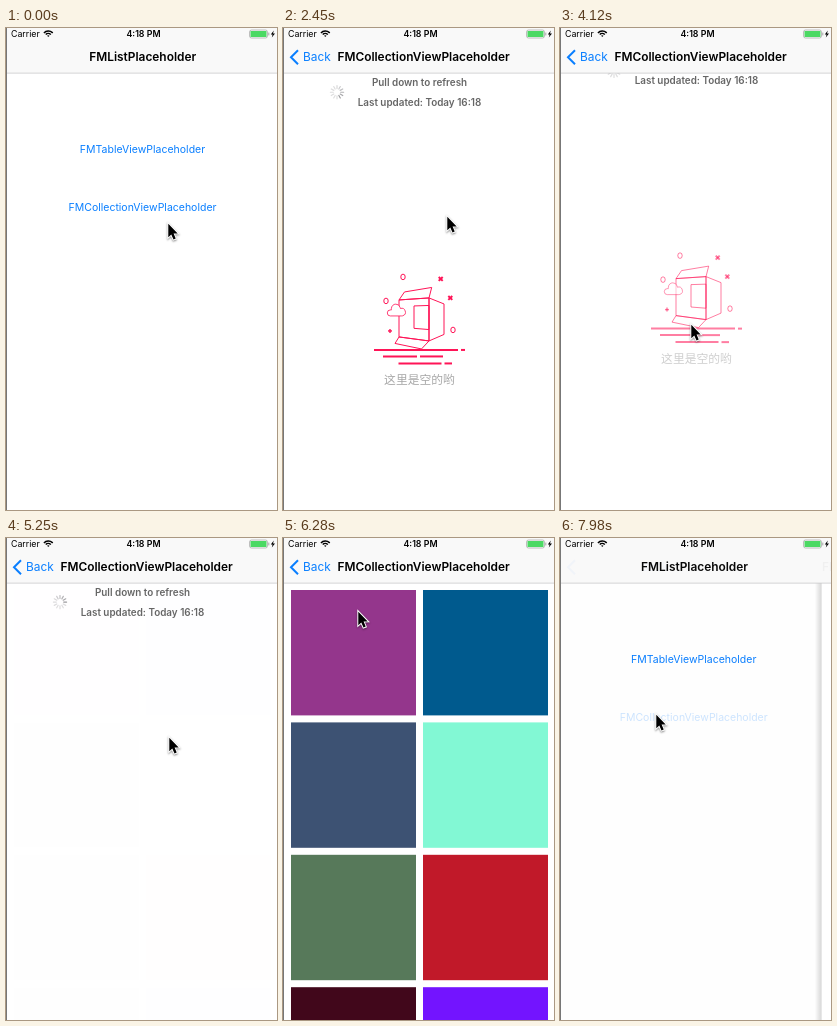
Animation of 271x482 px, one loop 8000 ms. Source, as an HTML page with a canvas:

```html
<!DOCTYPE html>
<html lang="en">
<head>
<meta charset="utf-8">
<title>List placeholder demo</title>
<style>
  html, body { margin: 0; width: 100%; height: 100%; overflow: hidden; background: #fff; }
  canvas { display: block; width: 271px; height: 482px; }
</style>
</head>
<body>
<canvas id="stage"></canvas>
<script>
const W = 271, H = 482, LOOP = 8000, BAR = 45, HEADER = 39;
const FIRST_TAP = 1030, POP = 7165, SECOND_TAP = 7890;
const TAP_DELAY = 83, SLIDE = 540;
const BLUE = '#0a7fff', PINK = '#ff1457';
const SANS = 'Inter, Roboto, sans-serif';
const CELLS = ['#94368c', '#005a8e', '#3d5273', '#82f8d4', '#57795a', '#c11929', '#41071b', '#7314ff'];

// Cursor moves: start, end, x, y
const MOVES = [
  [210, 1000, 146, 174], [1150, 1750, 164, 188], [3530, 3810, 130, 258], [4000, 4110, 131, 296],
  [4350, 4790, 163, 199], [5620, 6280, 75, 73], [6710, 6920, 28, 22], [7300, 7760, 96, 176]
];

const canvas = document.getElementById('stage');
const c = canvas.getContext('2d');
const dpr = window.devicePixelRatio || 1;
canvas.width = W * dpr;
canvas.height = H * dpr;

const clamp = v => Math.max(0, Math.min(1, v));
const mix = (a, b, p) => a + (b - a) * p;

function bezier(x1, y1, x2, y2) {
  const at = (a, b, s) => 3 * a * s * (1 - s) * (1 - s) + 3 * b * s * s * (1 - s) + s * s * s;
  return x => {
    let lo = 0, hi = 1;
    for (let i = 0; i < 24; i++) {
      const mid = (lo + hi) / 2;
      if (at(x1, x2, mid) < x) lo = mid; else hi = mid;
    }
    return at(y1, y2, lo);
  };
}
const easeInOut = bezier(0.42, 0, 0.58, 1);
const easeSlide = bezier(0.32, 0.72, 0, 1);

function ramp(t, start, length, ease = easeInOut) {
  const x = clamp((t - start) / length);
  return x === 0 || x === 1 ? x : ease(x);
}

function layer(alpha, dx, dy, draw) {
  if (alpha <= 0) return;
  c.save();
  c.globalAlpha *= alpha;
  c.translate(dx, dy);
  draw();
  c.restore();
}

function text(str, x, y, { size, weight = 400, color = '#000', align = 'center', family = SANS }) {
  c.font = `${weight} ${size}px ${family}`;
  c.fillStyle = color;
  c.textAlign = align;
  c.fillText(str, x, y);
}

function path(points, close) {
  c.beginPath();
  points.forEach(([x, y]) => c.lineTo(x, y));
  if (close) c.closePath();
}

function line(x1, y1, x2, y2) {
  path([[x1, y1], [x2, y2]]);
  c.stroke();
}

function drawStatus() {
  text('Carrier', 5, 9.2, { size: 8.8, align: 'left' });
  text('4:18 PM', 137.5, 9.2, { size: 8.8, weight: 600 });

  c.strokeStyle = c.fillStyle = '#000';
  c.lineWidth = 1.5;
  for (const r of [1, 3.5, 6]) {
    c.beginPath();
    c.arc(42.3, 9, r, -Math.PI * 0.76, -Math.PI * 0.24);
    c.stroke();
  }

  c.strokeStyle = c.fillStyle = '#a5a5a5';
  c.lineWidth = 0.7;
  c.beginPath();
  c.roundRect(243.5, 2, 18, 8, 2);
  c.stroke();
  c.fillRect(262.3, 4.6, 1, 2.8);
  c.fillStyle = '#4cd964';
  c.fillRect(244.5, 3, 16, 6);

  c.fillStyle = '#000';
  path([[267.8, 2.5], [264.8, 6.5], [266.6, 6.5], [265.8, 9.6], [269, 5.4], [267, 5.4]], true);
  c.fill();
}

function drawNav(root, back, titleX) {
  c.fillStyle = '#f9f9f9';
  c.fillRect(0, 0, W, BAR);
  c.fillStyle = '#c9c9cb';
  c.fillRect(0, BAR - 0.3, W, 0.8);

  const title = { size: 11.9, weight: 600 };
  layer(back, 0, 0, () => {
    c.strokeStyle = BLUE;
    c.lineWidth = 2;
    path([[15, 22.2], [8, 29.2], [15, 36.2]]);
    c.stroke();
    text('Back', 20 + root * 63, 33.4, { size: 11.9, color: BLUE, align: 'left' });
  });
  layer(root, (root - 1) * 63, 0, () => text('FMListPlaceholder', 136.7, 33.4, title));
  layer(1 - root, titleX, 0, () => text('FMCollectionViewPlaceholder', 140.6, 33.4, title));
  drawStatus();
}

function drawMenu(lit) {
  c.fillStyle = '#fff';
  c.fillRect(0, 0, W, H);
  const link = { size: 10.5, color: BLUE };
  text('FMTableViewPlaceholder', 136.5, 125, link);
  layer(lit, 0, 0, () => text('FMCollectionViewPlaceholder', 136.5, 183.3, link));
}

function drawSpinner(t) {
  const head = Math.floor(t * 12 / 1000);
  c.strokeStyle = '#646469';
  c.lineCap = 'round';
  c.lineWidth = 1.2;
  for (let i = 0; i < 12; i++) {
    const age = (head - i) % 12;
    layer(Math.max(0.22, 0.65 - age * 0.08), 54, 64.3, () => {
      c.rotate(i * Math.PI / 6);
      line(0, -3.7, 0, -6.6);
    });
  }
  c.lineCap = 'butt';
}

function drawBox() {
  const a = [116, 272], b = [146, 270], d = [146, 313], e = [116, 309];
  const front = (u, v) => [mix(a[0], b[0], u), mix(mix(a[1], b[1], u), mix(e[1], d[1], u), v)];
  const faces = [
    [a, b, d, e],
    [a, [121.5, 264], [148.7, 259.5], b],
    [b, [161, 276], [161, 306.5], d],
    [e, [112, 315.5], [138.5, 321], d],
    [front(1, 0.175), front(0.5, 0.175), front(0.5, 0.735), front(1, 0.735)]
  ];
  c.lineWidth = 1;
  for (const face of faces) {
    path(face, true);
    c.stroke();
  }
}

function drawCloud() {
  const { PI } = Math;
  c.lineWidth = 0.8;
  c.fillStyle = '#fff';
  c.beginPath();
  c.arc(107.3, 285, 3, PI / 2, -PI * 0.4);
  c.arc(112.8, 280.6, 4.4, PI, -PI * 0.1);
  c.arc(118.6, 284.2, 3.8, -PI * 0.6, PI / 2);
  c.closePath();
  c.fill();
  c.stroke();
}

const MARKS = {
  ring() {
    c.lineWidth = 1;
    c.beginPath();
    c.ellipse(0, 0, 2.2, 2.8, 0, 0, 7);
    c.stroke();
  },
  plus() {
    c.lineWidth = 1.4;
    line(-2, 0, 2, 0);
    line(0, -2, 0, 2);
  },
  cross() {
    c.rotate(Math.PI / 4);
    c.scale(1.4, 1.4);
    MARKS.plus();
  }
};

function drawEmpty() {
  c.strokeStyle = PINK;
  c.lineJoin = 'round';
  drawBox();
  drawCloud();

  const mark = (kind, x, y) => layer(1, x, y, MARKS[kind]);
  mark('ring', 120, 249);
  mark('ring', 103, 273);
  mark('ring', 170, 302);
  mark('cross', 157.7, 251);
  mark('cross', 167.3, 270);
  mark('plus', 107, 303);

  // Ground: each line breaks once near its right end
  const ground = (x, gap, end, y) => {
    line(x, y, gap, y);
    line(gap + 3, y, end, y);
  };
  c.lineWidth = 2;
  ground(91, 175, 182, 322);
  ground(100, 134, 160, 328.5);
  ground(115.5, 158.5, 169, 335.5);

  text('这里是空的哟', 136.5, 356, {
    size: 11.8, weight: 300, color: '#a8a8a8', family: '"Noto Sans CJK SC", "Noto Sans CJK", sans-serif'
  });
}

function drawCells() {
  CELLS.forEach((color, i) => {
    c.fillStyle = color;
    c.fillRect(8 + i % 2 * 132, 52 + (i >> 1) * 132.4, 125, 125.4);
  });
}

function drawHeader(t, open, loading) {
  const label = { size: 9.9, weight: 600, color: '#666' };
  text(loading ? 'Loading ...' : 'Pull down to refresh', 136.5, 58.4, label);
  text('Last updated: Today 16:18', 136.5, 77.8, label);
  layer(loading ? 1 : open, 0, 0, () => drawSpinner(t));
}

// Two refreshes: the first ends with the placeholder, the second with cells
function drawList(t) {
  const again = t > 4000, fresh = t >= SECOND_TAP;
  const [start, end] = again ? [4003, 5230] : [1150, 2440];
  const opened = fresh ? 0 : ramp(t, start, 250);
  const closed = fresh ? 0 : ramp(t, end, 400);
  const open = opened - closed, loading = t < end;

  c.fillStyle = '#fff';
  c.fillRect(0, 0, W, H);
  const y = (open - 1) * HEADER;
  layer(again ? (fresh ? 0 : 1 - opened) : +!loading, 0, y, drawEmpty);
  layer(again ? closed : 0, 0, 0, drawCells);
  layer(+(open > 0), 0, y, () => drawHeader(t, open, loading));
}

function drawEdge(x) {
  const g = c.createLinearGradient(x - 7, 0, x, 0);
  g.addColorStop(0, 'rgba(0,0,0,0)');
  g.addColorStop(1, 'rgba(0,0,0,.16)');
  c.fillStyle = g;
  c.fillRect(x - 7, 0, 7, H);
}

function drawCursor(t) {
  let x = 162, y = 195;
  for (const [start, end, toX, toY] of MOVES) {
    const p = ramp(t, start, end - start);
    x = mix(x, toX, p);
    y = mix(y, toY, p);
  }
  layer(1, x, y, () => {
    path([[0.3, 0.8], [0.3, 14.2], [3.3, 11.5], [5.5, 16.5], [7.7, 15.6], [5.6, 10.6], [9.7, 10.4]], true);
    c.lineJoin = 'miter';
    c.lineWidth = 2;
    c.strokeStyle = '#fff';
    c.shadowColor = 'rgba(0,0,0,.45)';
    c.shadowBlur = 2 * dpr;
    c.shadowOffsetY = dpr;
    c.stroke();
    c.shadowColor = 'transparent';
    c.fillStyle = '#000';
    c.fill();
  });
}

function render(t) {
  c.setTransform(dpr, 0, 0, dpr, 0, 0);
  c.clearRect(0, 0, W, H);

  const tap = t < SECOND_TAP ? FIRST_TAP : SECOND_TAP;
  const pushed = ramp(t, tap + TAP_DELAY, SLIDE, easeSlide);
  const popped = t < SECOND_TAP ? ramp(t, POP, SLIDE, easeSlide) : 0;
  const shown = pushed - popped;
  const edge = W * (1 - shown);
  const lit = t >= tap && popped === 0 ? 0.2 : 1;

  layer(+(shown < 1), 0, 0, () => {
    layer(1, -0.3 * W * shown, 0, () => drawMenu(lit));
    c.fillStyle = `rgba(0,0,0,${0.1 * shown})`;
    c.fillRect(0, 0, W, H);
    if (shown > 0) drawEdge(edge);
  });
  layer(+(shown > 0), edge, 0, () => drawList(t));

  const back = popped > 0 ? clamp(1 - 3.3 * popped) : shown;
  drawNav(1 - shown, back, (1 - shown) * (popped > 0 ? 156 : 215));
  c.fillStyle = '#777';
  c.fillRect(0, 0, 1, H);
  drawCursor(t);
}

const begin = performance.now();
function tick() {
  render((performance.now() - begin) % LOOP);
  requestAnimationFrame(tick);
}
tick();
</script>
</body>
</html>
```
